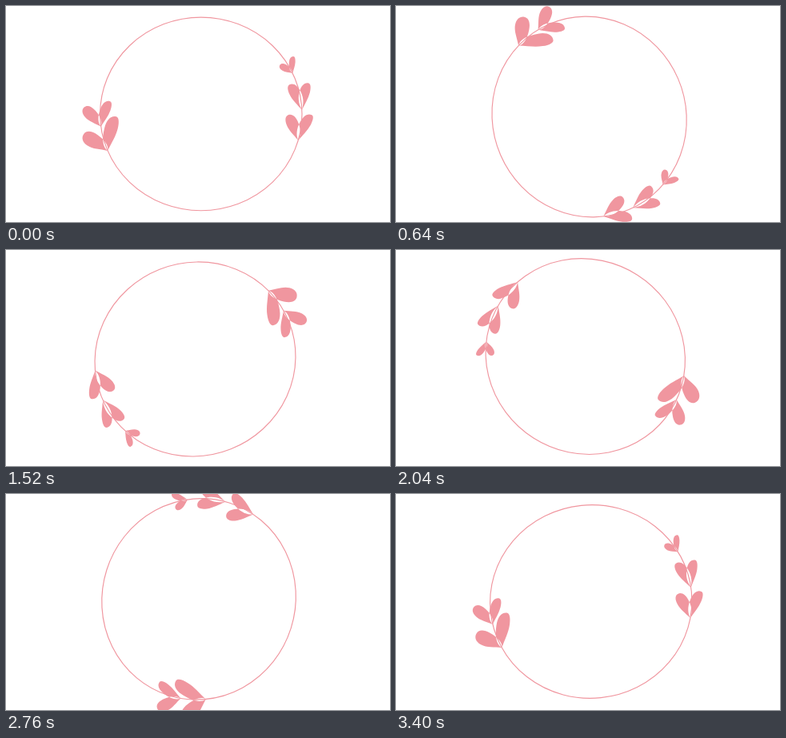
An HTML page with a canvas that plays this animation: 480x270 px, repeating every 3.44 s.

```html
<!DOCTYPE html>
<html lang="en">
<head>
<meta charset="utf-8">
<title>Heart wreath</title>
<style>
  html, body { margin: 0; width: 100%; height: 100%; overflow: hidden; background: #fff; }
  canvas { display: block; }
</style>
</head>
<body>
<canvas id="stage" width="480" height="270"></canvas>
<script>
const ctx = document.getElementById('stage').getContext('2d');
const PINK = '#f0969f';
const LOOP = 3440, STEP = 40, TURN = 3456;
const RING = { x: 243.8, y: 134.9, rx: 126.2, ry: 120.8 };
const rad = deg => deg * Math.PI / 180;

// A leaf grows from (0, 0) along `dir`; side 1 has its partner on the right, -1 on the left.
// Its inner edge sets off towards the partner, its outer edge swells slowly.
function addLeaf(path, x, y, dir, side, len, spread, outer) {
  const inner = .245, lead = .18, c = Math.cos(dir), s = Math.sin(dir);
  const at = (u, v) => [x + len * (u * c - side * v * s), y + len * (u * s + side * v * c)];
  const curve = (...pts) => path.bezierCurveTo(...pts.flatMap(([u, v]) => at(u, v)));
  path.moveTo(x, y);
  curve([.25, -.4 * outer], [.45, -outer], [.68, -outer]);
  curve([.88, -outer], [1, -.6 * outer], [1, 0]);
  curve([1, .6 * inner], [.86, inner], [.6, inner]);
  curve([.3, inner], [lead * Math.cos(spread), lead * Math.sin(spread)], [0, 0]);
  path.closePath();
}

// The tip sits on the ring; the wider the heart opens, the fuller its left side.
function addHeart(path, place, dir, open, left, right) {
  const x = RING.x + RING.rx * Math.cos(rad(place));
  const y = RING.y + RING.ry * Math.sin(rad(place));
  addLeaf(path, x, y, rad(dir), 1, left, rad(open), open * .0037);
  addLeaf(path, x, y, rad(dir + open), -1, right, rad(open), .125);
}

const leaves = new Path2D();
addHeart(leaves, 172.5, -131, 61, 32, 33.5);
addHeart(leaves, 157.6, -145, 69, 36.5, 44);
addHeart(leaves, -24.9, -147, 60, 19, 21);
addHeart(leaves, -2.3, -116, 40, 35.5, 34.7);
addHeart(leaves, 15.9, -111.5, 50, 34, 36);

const ring = new Path2D();
ring.ellipse(RING.x, RING.y, RING.rx, RING.ry, 0, 0, Math.PI * 2);

function draw(now) {
  const t = Math.floor(((now + 0.5) % LOOP) / STEP) * STEP;
  ctx.fillStyle = '#fff';
  ctx.fillRect(0, 0, 480, 270);
  ctx.save();
  ctx.translate(240, 135);
  ctx.rotate(t / TURN * Math.PI * 2);
  ctx.translate(-240, -135);
  ctx.strokeStyle = ctx.fillStyle = PINK;
  ctx.lineWidth = 1.15;
  ctx.stroke(ring);
  ctx.fill(leaves);
  ctx.restore();
}

function tick() {
  draw(performance.now());
  requestAnimationFrame(tick);
}
tick();
</script>
</body>
</html>
```
